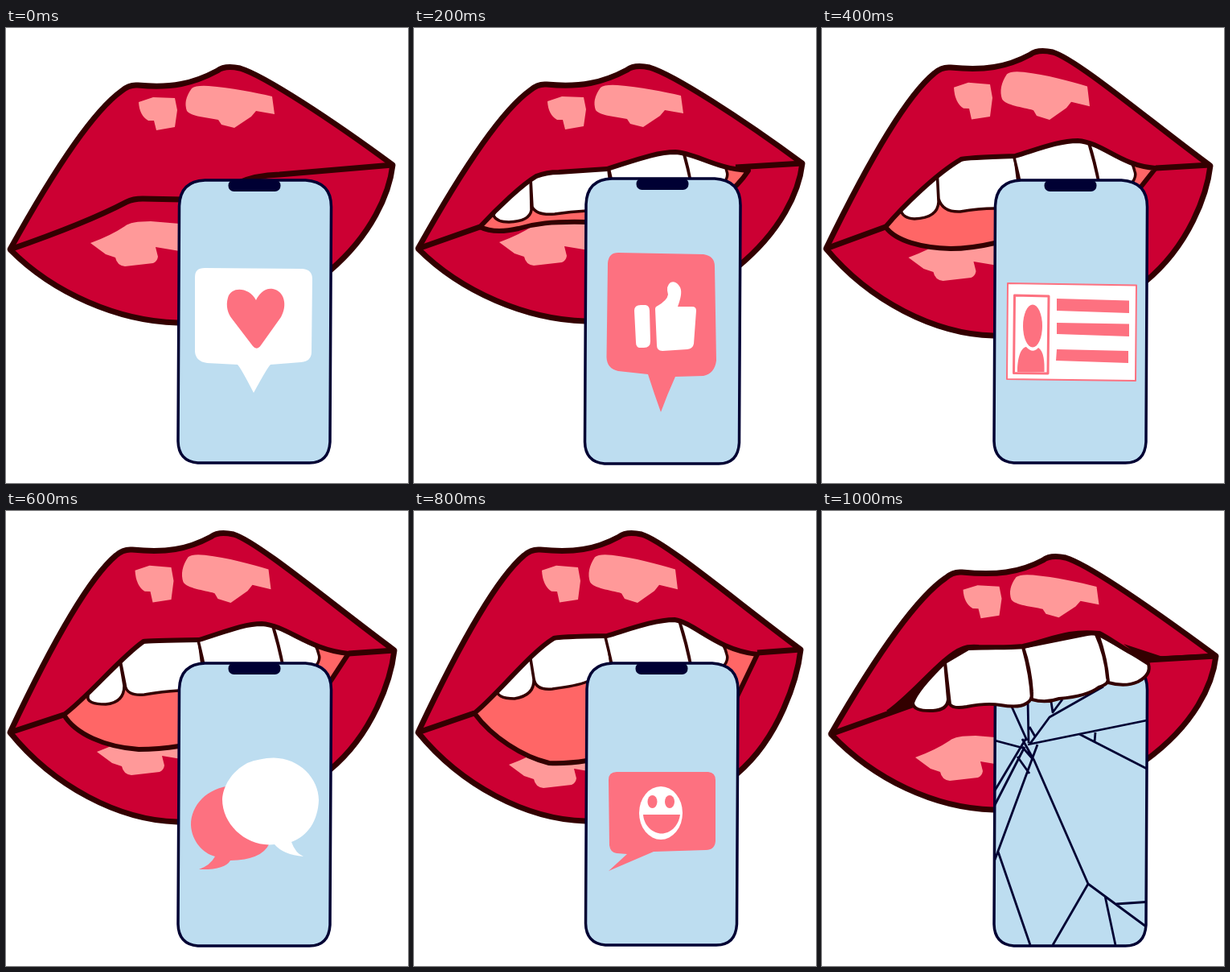
Write an HTML page with a canvas that moves like this. It is 500 px wide and 565 px high and loops after 1200 ms.

```html
<!DOCTYPE html>
<html lang="en">
<head>
<meta charset="utf-8">
<title>Lips and phone</title>
<style>
  html, body { margin: 0; width: 100%; height: 100%; overflow: hidden; background: #fff; }
  canvas { display: block; }
</style>
</head>
<body>
<canvas id="stage" width="500" height="565"></canvas>
<script>
const ctx = document.getElementById('stage').getContext('2d');
const STEP = 200;
const RED = '#cc0033', DARK = '#330000', SHINE = '#ff9999', TONGUE = '#ff6666';
const NAVY = '#000033', SCREEN = '#bdddf0', PINK = '#fd7180', WHITE = '#fff';

function shape(d, fill, stroke, width) {
  const p = new Path2D(d);
  if (fill) { ctx.fillStyle = fill; ctx.fill(p); }
  if (stroke) { ctx.strokeStyle = stroke; ctx.lineWidth = width; ctx.stroke(p); }
}

function oval(x, y, rx, ry, fill) {
  ctx.beginPath();
  ctx.ellipse(x, y, rx, ry, 0, 0, Math.PI * 2);
  ctx.fillStyle = fill;
  ctx.fill();
}

const UPPER_SHINE =
  'M165 92L183 86L210 87L213 102L210 123L187 127L184 115H177Q166 109 165 92Z' +
  'M231 75Q236 71 252 72C280 74 310 80 331 85L334 107L311 103L305 110L284 124L268 120L264 114' +
  'C250 111 230 110 225 103Q220 90 231 75Z';
const LOWER_SHINE =
  'M105 267Q130 258 148 246Q155 240 180 240L216 243V277L186 272L189 284Q188 290 183 292' +
  'L148 296Q138 295 136 285L124 281Z';
const BACK_TEETH =
  'M235 145Q242 172 247 195H345Q339 162 328 130Z' +
  'M328 130Q338 162 345 195H383Q392 186 389 178Q387 168 375 150Z';

// left: mouth corner, a and b: peaks of the upper lip, right: mouth corner,
// side: height of the right edge at the phone, base: lower edge at the phone
function lipsPath({ left: [lx, ly], a: [ax, ay], b: [bx, by], right: [rx, ry], side, base }) {
  const dx = ax - 17 - lx, dy = ay + 7 - ly;
  return `M${lx} ${ly}C${lx + .33 * dx} ${ly + .42 * dy} ${lx + .72 * dx} ${ly + .86 * dy} ${ax - 17} ${ay + 7}
    Q${ax - 8} ${ay - 1} ${ax + 3} ${ay}
    C${ax + 45} ${ay + 4} ${bx - 43} ${by + 21} ${bx - 13} ${by + 5}
    Q${bx - 4} ${by - 2} ${bx + 15} ${by + 2}
    C${bx + 45} ${by + 11} ${rx - 76} ${ry - 56} ${rx} ${ry}
    C${rx - 4} ${ry + 35} ${rx - 26} ${side - 43} 402 ${side + 2}
    L380 ${side + 20}L213 ${base}C140 ${base - 2} ${lx + 54} ${ly + .6 * (base - ly)} ${lx} ${ly}Z`;
}

function lips(pose) {
  const outline = lipsPath(pose);
  const [skew, scale, dx, dy] = pose.shine;
  shape(outline, RED);
  ctx.save();
  ctx.transform(1, skew, 0, scale, dx, dy);
  shape(UPPER_SHINE, SHINE);
  ctx.restore();
  ctx.save();
  ctx.translate(...pose.low);
  shape(LOWER_SHINE, SHINE);
  ctx.restore();
  shape(outline, null, DARK, 7);
  shape(pose.seam, null, DARK, 7);
}

function openMouth({ mouth, teeth }) {
  shape(mouth, TONGUE);
  ctx.save();
  ctx.clip(new Path2D(mouth));
  shape(teeth, WHITE, DARK, 3.5);
  shape(BACK_TEETH, WHITE, DARK, 3.5);
  ctx.restore();
  shape(mouth, null, DARK, 6);
}

function phone([l, t, r, b]) {
  shape(`M${l} ${t + 32}Q${l + 1} ${t + 1} ${l + 32} ${t}H${r - 32}Q${r} ${t + 2} ${r} ${t + 33}
    L${r - 1.5} ${b - 26}Q${r - 3} ${b} ${r - 27} ${b}H${l + 23}Q${l - 1} ${b - 2} ${l - 1.5} ${b - 27}Z`,
    SCREEN, NAVY, 3.5);
  ctx.beginPath();
  ctx.roundRect((l + r) / 2 - 33.5, t - .5, 65, 14.5, 7);
  ctx.fillStyle = NAVY;
  ctx.fill();
}

function heart() {
  shape('M235 309Q235 298 247 298L369 299Q381 300 381 312L380 402Q380 414 367 415L329 418Q326 420 308 453' +
    'Q292 422 288 418L250 416Q236 414 235 402Z', WHITE);
  shape('M311 338C303 322 280 320 276 335C273 345 276 355 281 361L307 395Q312 401 317 394L342 359' +
    'C350 345 347 327 332 324C322 322 314 331 311 338Z', PINK);
}

function thumb() {
  shape('M241 292Q242 279 254 279L360 281Q374 283 374 296L376 413Q374 429 360 432L325 433Q315 455 307 477' +
    'Q299 455 291 430L254 426Q240 423 239.5 409Z', PINK);
  shape('M274 351Q274 344 282 344H288Q293 345 293 351L294 389Q294 397 286 397H280Q276 396 276 390Z', WHITE);
  shape('M300 349Q300 346 303 345Q315 338 316 331Q313 320 319 316Q326 313 331 322C334 328 331 338 328 346' +
    'H346Q351 346 351 351L348 392Q347 398 340 399L309 401Q302 401 302 394Z', WHITE);
}

function card() {
  shape('M231 317L391 319.5L390 438L230 436Z', WHITE, PINK, 2);
  shape('M239.5 332L282 333L281 429L238.5 428.5Z', null, PINK, 3);
  oval(262, 370, 12, 26.5, PINK);
  shape('M243 427C243 410 247 397 254 396Q262 405 269 397C276 401 277 415 276.5 427Z', PINK);
  shape('M292 336L382 338.5V354L292 351ZM292 366L382 367.5V383L292 380ZM292 399L381 401V416L291 413Z', PINK);
}

function chat() {
  shape('M280 341C250 344 230 365 230 390C231 410 245 425 260 429Q254 440 240 445Q272 446 279 434' +
    'Q318 433 327 414Z', PINK);
  shape('M333 306.5C365 307 389 332 389 359C388 385 375 404 355 411Q360 425 370 429Q345 427 334 414' +
    'C300 418 269 390 269 358C270 342 280 324 300 313Q315 307 333 306.5Z', WHITE);
}

function smile() {
  shape('M242 334Q242 324 252 324H366Q375 325 375 334V410Q374 421 363 421L298 423L242 447L265 426L252 425' +
    'Q244 424 243 415Z', PINK);
  oval(307, 375, 27, 33, WHITE);
  oval(296.5, 361, 6, 8, PINK);
  oval(318, 361, 6, 8, PINK);
  shape('M285 377H331C329 392 318 400.5 308 400.5C297 400.5 286 391 285 377Z', PINK);
}

function cracks() {
  shape('M215 285L249 294M404 260L256 290M256 236L257 288M236 243L255 285M258 290L283 256L350 218' +
    'M299 234L287 250L285 237M258 268L265 280M320 277L404 320M340 275L339 287M249 283L264 310L331 463' +
    'M287 539L331 463L403 516M352 478L365 539M366 488L403 485.5M215 433L268 290M219 423L259 539' +
    'M215 347L254 282M215 365L252 293M243 305L258 326M249 293L263 309', null, NAVY, 2.8);
}

function bite() {
  shape('M82 251Q130 215 153 187L130 240L110 243ZM375 165L430 183L405 189Z', DARK);
  shape('M153 188L157 234Q156 247 138 248Q113 249 113 238Q118 222 153 188Z' +
    'M343 153Q354 185 356 213Q377 219 393 212Q410 203 406 190Q378 172 343 153Z' +
    'M250 169Q260 205 261 234Q278 239 295 233Q330 230 344 219Q359 214 355 207Q353 180 340 151Z' +
    'M153 188Q155 205 159 240Q163 246 180 243Q205 238 222 241Q245 245 254 239Q262 235 261 225' +
    'Q259 195 250 169L182 171Z', WHITE, DARK, 4);
  shape('M82 250C115 227 150 180 175 171Q182 168 195 169Q230 170 250 168C285 160 305 148 345 152' +
    'C365 162 378 176 406 184L490 180', null, DARK, 6);
}

const BODY = [215.5, 189, 404.5, 540];
const poses = [
  {
    left: [5, 275], a: [161, 71], b: [276, 48], right: [481, 170], side: 300, base: 366,
    shine: [0, 1, 0, 0], low: [0, 0],
    seam: 'M5 275C60 256 110 237 150 216Q158 212 170 212L220 213M290 192Q310 183 340 182L481 170',
    body: BODY, icon: heart
  },
  {
    left: [5, 274], a: [162, 70], b: [278, 47], right: [483, 168], side: 295, base: 364,
    shine: [0, 1, 1, -1], low: [1, -1],
    seam: 'M5 274L82 247M400 173L483 168',
    mouth: 'M82 247C105 222 135 194 152 184Q165 179 180 179L240 175C270 166 300 154 325 154' +
      'C350 155 375 175 416 177Q404 195 385 210L215 241C170 240 150 243 130 249Q100 256 82 247Z',
    teeth: 'M99 233Q103 241 118 241Q144 240 146 226L145 185L110 190Z' +
      'M145 185L147 222Q152 233 175 231Q195 228 215 227H248L240 160L160 165Z',
    body: [214, 187, 406, 541], icon: thumb
  },
  {
    left: [5, 274], a: [157, 49], b: [272, 28], right: [483, 171], side: 313, base: 382,
    shine: [.04, 1.115, -1, -35.5], low: [2.5, 18],
    seam: 'M5 274L79 247M415 174L483 170',
    mouth: 'M79 247C100 222 142 181 173 163Q177 161 240 159C270 150 295 140 318 140' +
      'C350 142 370 171 415 174L385 212L215 267Q185 274 160 274C125 273 92 265 79 247Z',
    teeth: 'M98 226Q100 236 115 237Q144 236 145 216L143 175L108 185Z' +
      'M143 175L145 212Q150 229 172 228Q195 224 215 224H248L238 145L160 150Z',
    body: BODY, icon: card
  },
  {
    left: [5, 275], a: [154, 48], b: [268, 27], right: [483, 173], side: 320, base: 386,
    shine: [.04, 1.115, -4.5, -35.5], low: [8, 32],
    seam: 'M5 275L72 253M426 177L483 173',
    mouth: 'M72 253C102 231 142 182 171 162Q175 161 240 160C270 151 295 140 318 140' +
      'C350 142 375 172 426 177L390 232L215 292Q190 296 165 296C123 293 86 277 72 253Z',
    teeth: 'M102 230Q100 240 124 240Q147 238 147 217L140 175L105 195Z' +
      'M140 175L148 215Q149 230 172 228Q195 224 215 223H248L238 145L160 150Z',
    body: BODY, icon: chat
  },
  {
    left: [5, 275], a: [154, 48], b: [268, 27], right: [481, 172], side: 324, base: 385,
    shine: [.04, 1.115, -6, -35.5], low: [13, 48],
    seam: 'M5 275L75 251M427 176L481 172',
    mouth: 'M75 251C102 230 144 176 174 158Q178 156 240 155C270 146 300 135 324 135' +
      'C350 139 375 172 427 178L390 255L215 310Q190 314 168 313C135 305 97 281 75 251Z',
    teeth: 'M103 221Q102 233 125 233Q150 229 149 209L142 165L108 185Z' +
      'M142 165L149 208Q151 223 172 221Q203 217 215 212H248L238 140L160 145Z',
    body: [215, 189, 403, 539], icon: smile
  },
  {
    left: [11, 277], a: [171, 76], b: [288, 56], right: [490, 180], side: 308, base: 371,
    shine: [.02, 1, 10.5, 2.5], low: [11, 39],
    seam: 'M11 277L112 241M405 185L490 180',
    body: BODY, icon: cracks, over: bite
  }
];

function draw(pose) {
  ctx.fillStyle = WHITE;
  ctx.fillRect(0, 0, 500, 565);
  ctx.lineJoin = 'round';
  lips(pose);
  if (pose.mouth) openMouth(pose);
  phone(pose.body);
  pose.icon();
  if (pose.over) pose.over();
}

const start = performance.now();
function tick() {
  const t = performance.now() - start;
  draw(poses[Math.floor(t / STEP) % poses.length]);
  requestAnimationFrame(tick);
}
tick();
</script>
</body>
</html>
```
